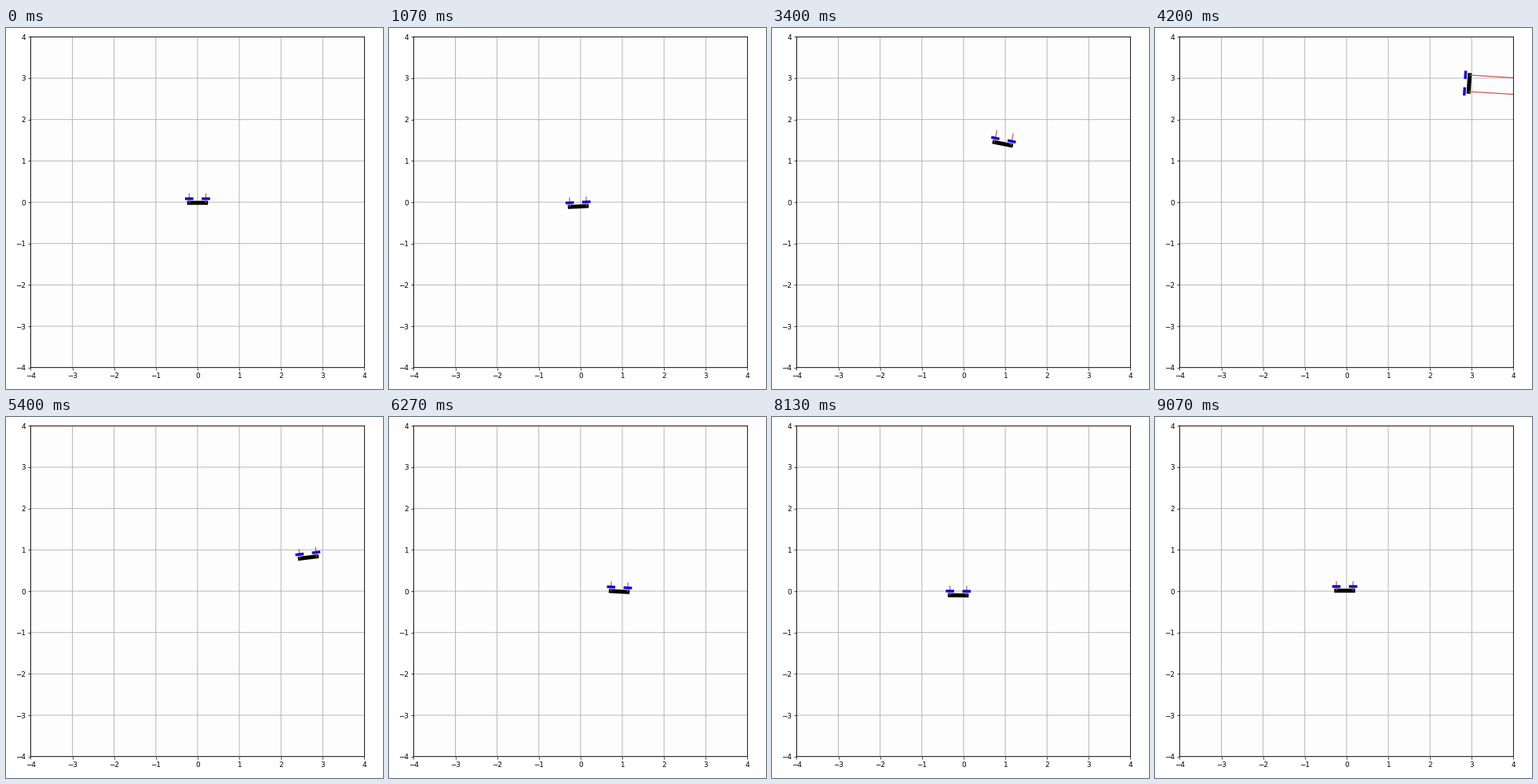
Write a matplotlib script that moves like this. It is 480 px wide and 460 px high and loops after 9.14 s.

```python
import matplotlib.pyplot as plt
import numpy as np
from matplotlib.animation import FuncAnimation

W, H, DPI = 480, 460, 64
LOOP, FRAMES = 9140, 138
TICK = 1 / 15      # seconds of flight per frame
STALL = 3.57       # the picture stands still about every fourth tick

# waypoints of the flight: time, x, y
T, X, Y = np.array([
    (0.00, 0.00, -0.015), (0.45, 0.085, -0.065), (1.50, -0.25, -0.08),
    (2.07, -0.546, 0.042), (2.80, -0.405, 0.56), (3.40, 0.938, 1.414),
    (3.80, 2.316, 2.23), (4.20, 2.938, 2.875), (4.67, 3.38, 2.305),
    (5.40, 2.655, 0.816), (6.20, 1.026, 0.03), (7.20, 0.072, -0.129),
    (9.07, -0.047, 0.02),
]).T


def smooth(t, values):
    """Cubic Hermite curve through the waypoints."""
    slope = np.gradient(values, T)
    i = min(np.searchsorted(T, t, side="right") - 1, len(T) - 2)
    span = T[i + 1] - T[i]
    u = (t - T[i]) / span
    s = u * u * (3 - 2 * u)
    bend = slope[i] * (1 - u) - slope[i + 1] * u
    return values[i] * (1 - s) + values[i + 1] * s + span * u * (1 - u) * bend


def bump(t, centre, width):
    return np.exp(-((t - centre) / width) ** 2 / 2)


def tilt(t):
    """Lean into the climb, flip hard to brake, then settle."""
    return np.radians(3 * bump(t, 1.1, 0.4) - 19.5 * bump(t, 2.92, 0.48)
                      + 86 * bump(t, 4.2, 0.25) + 8 * bump(t, 5.2, 0.5)
                      - 6 * bump(t, 6.8, 0.6))


def force(t):
    return 0.23 + 0.08 * bump(t, 3.2, 0.3) - 2.4 * bump(t, 4.2, 0.06)


def px(width):
    return width * 72 / DPI


fig = plt.figure(figsize=(W / DPI, H / DPI), dpi=DPI, facecolor="#fefefe")
left, right, top, bottom = 31.4, 456.4, 11.3, 432.7
ax = fig.add_axes([left / W, 1 - bottom / H, (right - left) / W,
                   (bottom - top) / H], facecolor="#fdfdfd")
ax.set(xlim=(-4, 4), ylim=(-4, 4), xticks=range(-4, 5), yticks=range(-4, 5))
ax.grid(True, color="#b0b0b0", linewidth=px(0.9))
for line in ax.get_xgridlines() + ax.get_ygridlines():
    line.set_snap(False)
for spine in ax.spines.values():
    spine.set_linewidth(px(0.9))
    spine.set_snap(False)


def rod(color, width):
    return ax.plot([], [], color=color, lw=px(width),
                   solid_capstyle="butt")[0]


body = rod("black", 5.1)
thrusts = [rod("#cc5046", 1.2) for _ in range(2)]
props = [rod("#1008d0", 3.5) for _ in range(2)]


def draw(k):
    if (k - 3.36) % STALL < 1:
        k = max(k - 1, 0)
    t = min(k * TICK, T[-1])
    x, y, angle = smooth(t, X), smooth(t, Y), tilt(t)
    c, s = np.cos(angle), np.sin(angle)

    def place(line, us, vs):
        us, vs = np.array(us), np.array(vs)
        line.set_data(x + us * c - vs * s, y + us * s + vs * c)

    place(body, [-0.25, 0.25], [0, 0])
    for arm, thrust, prop in zip((-0.2, 0.2), thrusts, props):
        place(thrust, [arm, arm], [0, force(t)])
        place(prop, [arm - 0.1, arm + 0.1], [0.1, 0.1])
    return [body, *thrusts, *props]


anim = FuncAnimation(fig, draw, frames=FRAMES, interval=LOOP / FRAMES,
                     repeat=True, repeat_delay=0, blit=False)
plt.show()
```
